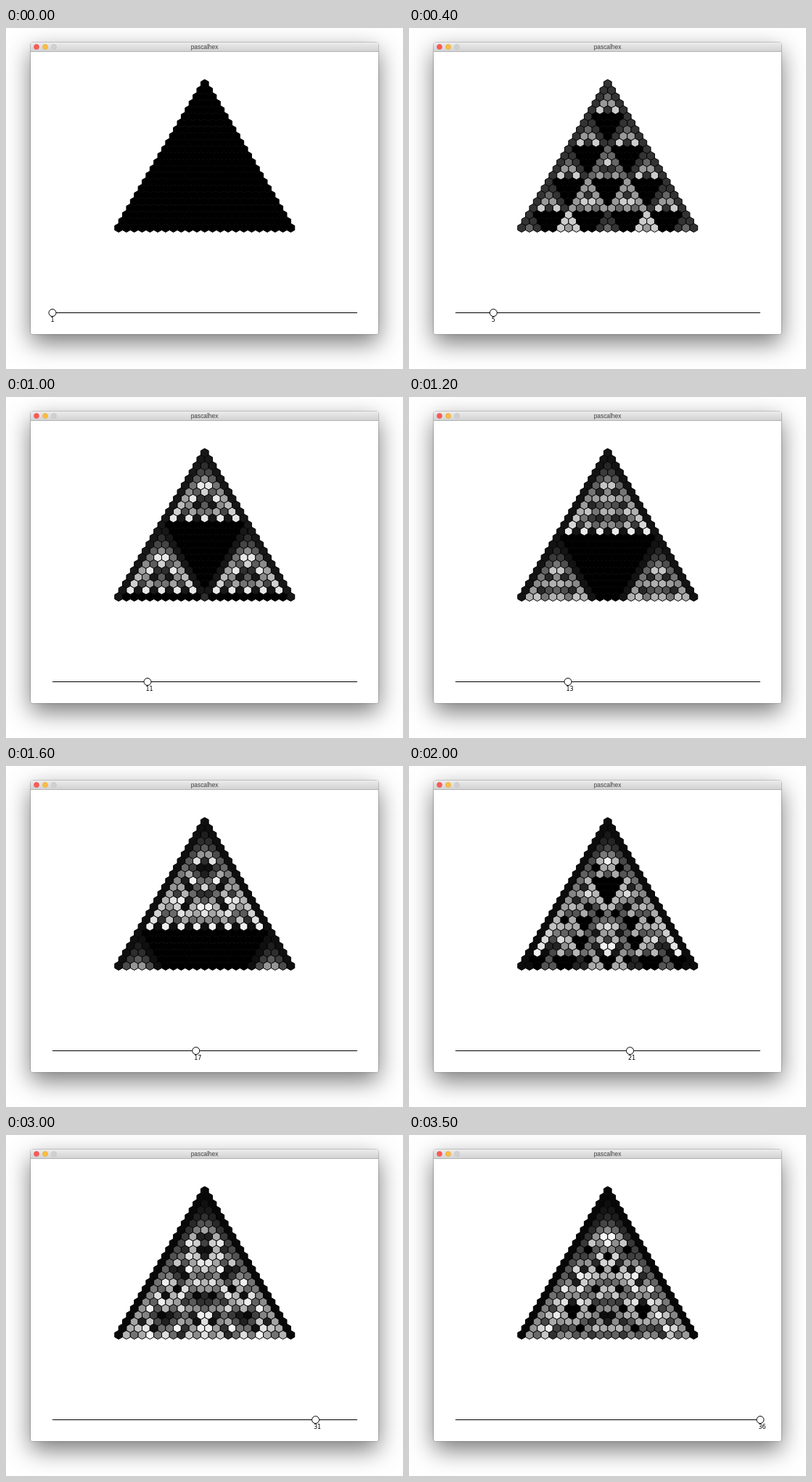
These frames come from a looping animation (547 by 470 pixels, 3.6 s). An HTML page:

```html
<!DOCTYPE html>
<html lang="en">
<head>
<meta charset="utf-8">
<title>pascalhex</title>
<style>
html, body { margin: 0; width: 100%; height: 100%; overflow: hidden; background: #fff; }
#window {
  position: absolute; left: 34px; top: 20px; width: 479px; height: 402px;
  border-radius: 3px; background: #fff; overflow: hidden;
}
#shadow {
  position: absolute; left: 34px; top: 20px; width: 479px; height: 402px; border-radius: 3px;
  box-shadow: 0 0 0 .6px rgba(0,0,0,.32), 0 12px 33px rgba(0,0,0,.53);
}
#bar {
  height: 12px; border-bottom: 1px solid #b4b4b4;
  background: linear-gradient(#ececec, #d2d2d2);
  font: 8.4px/12.5px "Liberation Sans", Arial, sans-serif;
  color: #3c3c3c; text-align: center;
}
svg { position: absolute; left: 0; top: 0; }
</style>
</head>
<body>
<div id="shadow"></div>
<div id="window"><div id="bar">pascalhex</div></div>
<svg width="547" height="470">
  <g stroke-width=".5">
    <circle cx="42" cy="26" r="3.5" fill="#fc5b57" stroke="#df4744"/>
    <circle cx="54" cy="26" r="3.5" fill="#fdbd3f" stroke="#de9f34"/>
    <circle cx="66" cy="26" r="3.5" fill="#d1d1d1" stroke="#bcbcbc"/>
  </g>
  <g id="cells" stroke="#000" stroke-width="1"></g>
  <path id="seams" fill="none" stroke="#fff" stroke-opacity=".08" stroke-width=".6"/>
  <path d="M64 392.5H484" stroke="#000"/>
  <circle id="knob" cy="392.5" r="5" fill="#fff" stroke="#000"/>
  <text id="label" y="404.6" font-family="DejaVu Sans, sans-serif" font-size="8"></text>
</svg>
<script>
const ROWS = 23, HALF = 5.39, RADIUS = 6, STEP_Y = 9.02, CX = 273.75, TOP = 77;
const FRAME = 100, COUNT = 36;
// knob path: [step, x]
const DRAG = [[0, 64], [6, 142.5], [7, 159], [12, 219], [20, 304.5], [25, 365.5], [30, 426.5], [35, 484]];

const el = id => document.getElementById(id);
const cells = [];
let seams = "";

function addCell(x, y, value) {
  const hex = document.createElementNS("http://www.w3.org/2000/svg", "polygon");
  const h = RADIUS / 2;
  hex.setAttribute("points", [
    [x, y - RADIUS], [x + HALF, y - h], [x + HALF, y + h],
    [x, y + RADIUS], [x - HALF, y + h], [x - HALF, y - h]
  ].join(" "));
  el("cells").append(hex);
  cells.push({ hex, value });
}

for (let row = 0; row < ROWS; row++) {
  let value = 1;
  for (let k = 0; k <= row; k++) {
    const x = CX + (2 * k - row) * HALF, y = TOP + row * STEP_Y;
    addCell(x, y, value);
    if (k > 0) seams += `M${x - HALF + 1} ${y - 3.5}L${x - 1} ${y - 5.5}`;
    if (k < row) seams += `M${x + 1} ${y - 5.5}L${x + HALF - 1} ${y - 3.5}`;
    value = value * (row - k) / (k + 1);
  }
}
el("seams").setAttribute("d", seams);

function knobX(step) {
  const i = Math.max(1, DRAG.findIndex(p => p[0] >= step));
  const [s0, x0] = DRAG[i - 1], [s1, x1] = DRAG[i];
  return x0 + (x1 - x0) * (step - s0) / (s1 - s0);
}

function draw(step) {
  const mod = step + 1, x = knobX(step);
  for (const { hex, value } of cells) {
    const g = Math.floor(value % mod * 255 / mod);
    hex.setAttribute("fill", `rgb(${g},${g},${g})`);
  }
  el("knob").setAttribute("cx", x);
  el("label").setAttribute("x", x - 2.5);
  el("label").textContent = mod;
}

let shown = -1;
const start = performance.now();
function tick() {
  const step = Math.floor((performance.now() - start) / FRAME) % COUNT;
  if (step !== shown) draw(shown = step);
  requestAnimationFrame(tick);
}
tick();
</script>
</body>
</html>
```
